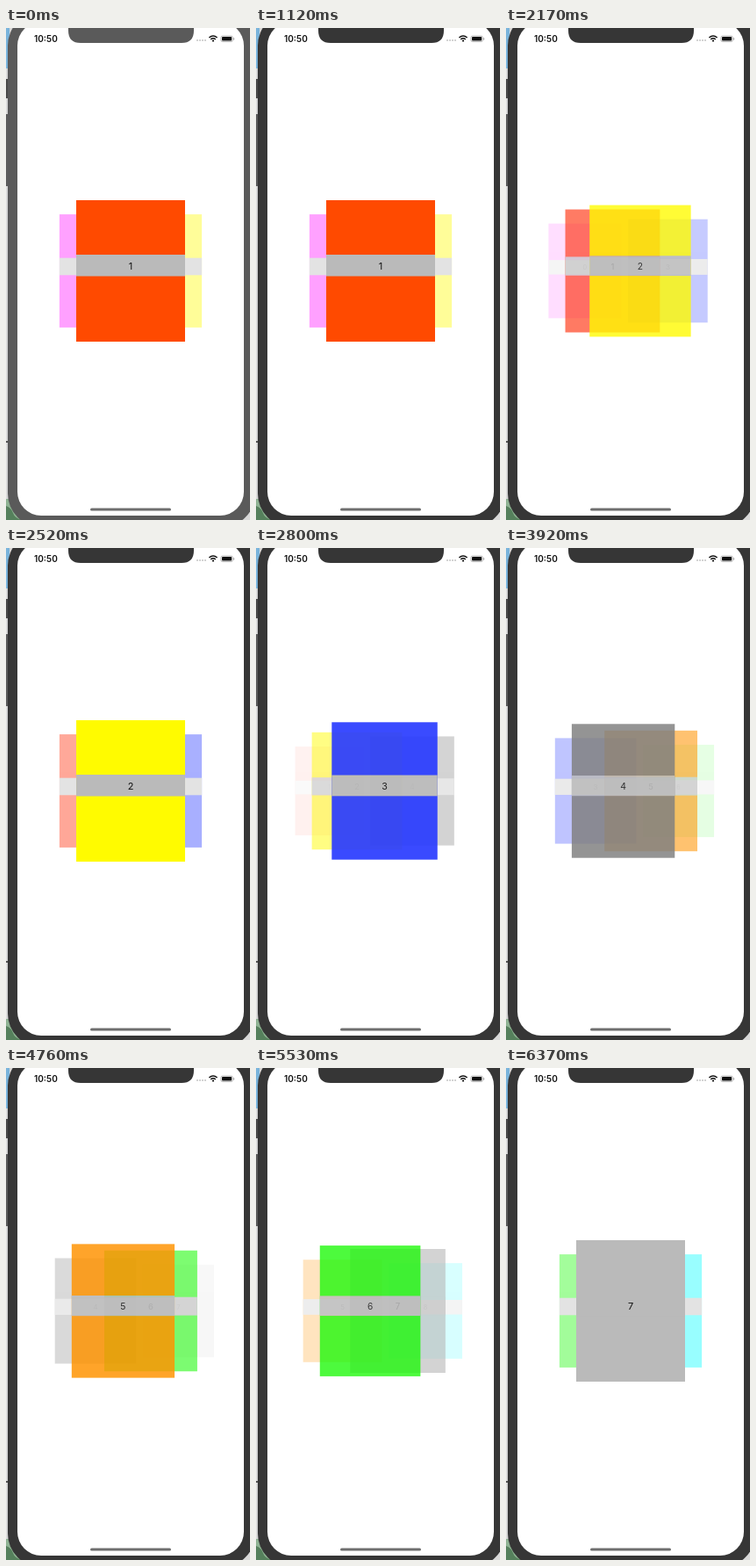
Write an HTML page that moves like this. It is 278 by 560 pixels and loops after 6720 ms.

```html
<!DOCTYPE html>
<html lang="en">
<head>
<meta charset="utf-8">
<title>Card carousel</title>
<style>
  html, body { margin: 0; width: 100%; height: 100%; overflow: hidden; background: #fff; }
  svg { display: block; width: 278px; height: 560px; }
  text { font-family: Inter, Roboto, sans-serif; }
</style>
</head>
<body>
<svg viewBox="0 0 278 560" width="278" height="560">
  <!-- desktop behind the phone -->
  <rect width="278" height="560" fill="#d8d8d8"/>
  <rect width="4" height="46" fill="#79b4dc"/>
  <rect y="58" width="4" height="22" fill="#4a4a4a"/>
  <rect y="98" width="4" height="82" fill="#5c5c5c"/>
  <rect y="470" width="4" height="2" fill="#555"/>
  <rect y="536" width="20" height="24" fill="#8fb393"/>
  <path d="M0 544q6 2 8 8t10 8h-18z" fill="#55805c"/>

  <!-- phone -->
  <rect id="body" x="2" y="-18" width="282" height="586" rx="38"/>
  <rect x="13" y="-7" width="258" height="562" rx="27" fill="#fff"/>
  <path id="notch" d="M68 -7Q71 -3 71 1V3Q71 17 85 17H200Q214 17 214 3V1Q214 -3 217 -7Z"/>

  <!-- status bar -->
  <text x="32" y="15.6" font-size="10" font-weight="600" fill="#111">10:50</text>
  <g fill="#c4c4c4">
    <circle cx="218" cy="14" r="1"/><circle cx="221" cy="14" r="1"/>
    <circle cx="224" cy="14" r="1"/><circle cx="227" cy="14" r="1"/>
  </g>
  <g fill="none" stroke="#111" stroke-width="1.5">
    <path d="M231.4 11Q236 7 240.6 11"/>
    <path d="M233.2 13Q236 10.6 238.8 13"/>
  </g>
  <circle cx="236" cy="14.6" r="1.1" fill="#111"/>
  <rect x="244.9" y="9" width="13.4" height="6.6" rx="1.9" fill="none" stroke="#999" stroke-width=".7"/>
  <rect x="246" y="10.1" width="11.2" height="4.4" rx=".9" fill="#111"/>
  <rect x="259.2" y="11.2" width="1" height="2.2" rx=".5" fill="#999"/>

  <g id="deck"></g>
  <rect x="96" y="546.4" width="92" height="3" rx="1.5" fill="#6e6e6e"/>
</svg>
<script>
const LOOP = 6720, STEP = 70;
const MID_X = 142, MID_Y = 276.5, W = 124, H = 161, GAP = 31.5;
const COLORS = ['#ff14ff', '#ff4a00', '#fffb00', '#283aff', '#808080',
                '#ff9300', '#19f905', '#bababa', '#00fdff'];
// each swipe: start in ms, rate of settling per ms
const SWIPES = [[1940, .0097], [2500, .0115], [3220, .0115],
                [3891, .035], [4658, .01], [5430, .0132]];

const $ = id => document.getElementById(id);
const deck = $('deck');

function make(tag, attrs, parent) {
  const el = document.createElementNS('http://www.w3.org/2000/svg', tag);
  for (const key in attrs) el.setAttribute(key, attrs[key]);
  return parent.appendChild(el);
}

// cards are drawn around their own centre
const cards = COLORS.map((fill, i) => {
  const g = make('g', {}, deck);
  const face = make('rect', { x: -W / 2, y: -H / 2, width: W, height: H, fill }, g);
  make('rect', { x: -W / 2, y: -18.5, width: W, height: 24.5, fill: '#bababa' }, g);
  make('text', { x: 0, y: -1.7, 'font-size': 11, 'text-anchor': 'middle', fill: '#111' }, g)
    .textContent = i;
  return { g, face, i };
});

function settle(x) {
  return x <= 0 ? 0 : 1 - (1 + x) * Math.exp(-x);
}

function position(t) {
  return SWIPES.reduce((p, [start, rate]) => p + settle((t - start) * rate), 1);
}

function opacity(dist) {
  return dist < 1 ? 1 - .6 * dist : Math.max(0, .4 * (2 - dist));
}

function draw(t) {
  const pos = position(t);
  const dim = Math.min(1, Math.max(0, (t - 630) / 490));
  const v = Math.round(90 - 36 * dim);
  for (const id of ['body', 'notch']) $(id).setAttribute('fill', `rgb(${v},${v},${v})`);
  cards[1].face.setAttribute('fill', t < 1890 ? COLORS[1] : '#ff2600');

  const byDepth = [...cards].sort((a, b) => Math.abs(b.i - pos) - Math.abs(a.i - pos));
  for (const { g, i } of byDepth) {
    const d = i - pos, dist = Math.abs(d), alpha = opacity(dist);
    g.setAttribute('transform',
      `translate(${MID_X + GAP * d} ${MID_Y}) scale(${Math.max(.6, 1 - .2 * dist)})`);
    g.setAttribute('opacity', alpha);
    g.setAttribute('display', alpha < .004 ? 'none' : 'inline');
    deck.appendChild(g);
  }
}

let origin = null, shown = -1;
function tick(now) {
  if (origin === null) origin = now;
  const t = Math.floor((now - origin) % LOOP / STEP) * STEP;
  if (t !== shown) draw(shown = t);
  requestAnimationFrame(tick);
}
draw(0);
requestAnimationFrame(tick);
</script>
</body>
</html>
```
